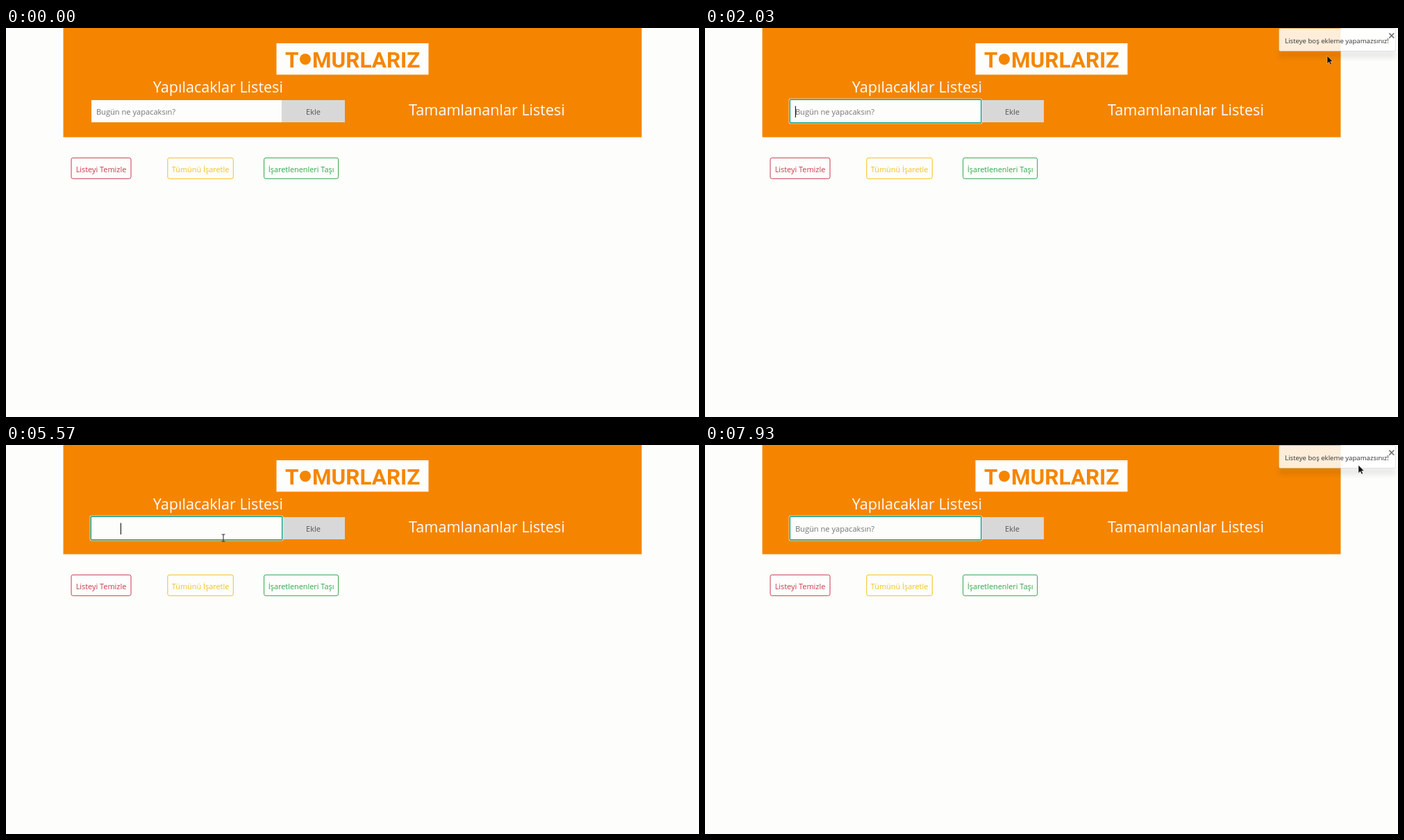
An HTML page for the animation above (8 s loop, 998 px wide and 561 px high).

```html
<!DOCTYPE html>
<html lang="tr">
<head>
<meta charset="utf-8">
<style>
  html, body { margin: 0; width: 100%; height: 100%; overflow: hidden; background: #fdfdfc; }
  svg { display: block; width: 998px; height: 561px; font-family: "Open Sans", "Noto Sans", sans-serif; }
  text { text-anchor: middle; }
  .title { font-size: 21.6px; fill: #fdfdfc; }
  .label { font-size: 11.1px; fill: #555; }
  .button { font-size: 10.9px; }
  .brand { font: 700 31.5px Roboto, sans-serif; fill: #f58600; text-anchor: start; }
</style>
</head>
<body>
<svg viewBox="0 0 998 561">
  <defs>
    <filter id="shadow" x="-20%" y="-50%" width="140%" height="220%">
      <feGaussianBlur stdDeviation="4"/>
    </filter>
  </defs>

  <rect x="82.5" width="833" height="157.5" fill="#f58500"/>
  <rect x="389.5" y="22" width="219" height="45.3" fill="#fdfdfc"/>
  <text class="brand" x="402" y="56.5">T</text>
  <circle cx="431" cy="45" r="8" fill="#f58600"/>
  <text class="brand" x="441" y="56.5">MURLARIZ</text>

  <text class="title" x="305.3" y="93">Yapılacaklar Listesi</text>
  <text class="title" x="692.5" y="125.5">Tamamlananlar Listesi</text>

  <rect x="123" y="104" width="274" height="32" fill="#fdfdfc"/>
  <rect id="add" x="397" y="104" width="91" height="32"/>
  <text class="label" x="442.5" y="125">Ekle</text>
  <g id="focus" fill="none">
    <rect x="121.2" y="102.2" width="277.6" height="35.6" rx="1.5" stroke="#fdfdfc" stroke-width=".9"/>
    <rect x="122.3" y="103.3" width="275.4" height="33.4" rx="1" stroke="#16a085" stroke-width="1.4"/>
  </g>
  <text id="hint" class="label" x="187" y="125" style="fill:#747474">Bugün ne yapacaksın?</text>
  <rect id="caret" y="112.5" width="1.2" height="16.5" fill="#222"/>

  <g id="buttons"></g>

  <g id="toast">
    <path d="M826 34 H995 V42 H826Z" fill="#000" opacity=".1" filter="url(#shadow)"/>
    <rect x="826.5" y=".5" width="168" height="33" rx="2" fill="#fff" fill-opacity=".85" stroke="#000" stroke-opacity=".1"/>
    <text x="910" y="22" font-size="9.6" fill="#333">Listeye boş ekleme yapamazsınız!</text>
    <path d="M985.3 7.5 l7 7 m0 -7 l-7 7" stroke="#666670" stroke-width="1.6"/>
  </g>

  <g id="pointer">
    <path id="arrow" d="M0 0 V11.5 L2.7 9 L4.6 13 L6.4 12.2 L4.7 8.3 H8Z" fill="#111" stroke="#eee" stroke-width=".5"/>
    <path id="hand" d="M-1 1 Q0 0 1 1 V4.5 L4.5 5 Q5.5 5.5 5.5 7 V8.5 L4.5 11.5 H-1 L-3 7.5 Q-3 6 -1 7Z" fill="#111"/>
    <path id="beam" d="M-2.5 -5 H-.5 L0 -4.5 L.5 -5 H2.5 M0 -4.5 V4.5 M-2.5 5 H-.5 L0 4.5 L.5 5 H2.5" fill="none" stroke="#333" stroke-width="1.1"/>
  </g>
</svg>
<script>
const LOOP = 8000;
const $ = id => document.getElementById(id);
const clamp = v => Math.max(0, Math.min(1, v));
const show = (id, on) => { $(id).style.display = on ? '' : 'none'; };

const buttons = [
  ['Listeyi Temizle', 86, '#cb3a4c'],
  ['Tümünü İşaretle', 94.5, '#f2c21c'],
  ['İşaretlenenleri Taşı', 107, '#31a64b'],
];
$('buttons').innerHTML = buttons.map(([name, width, color], i) => {
  const x = 94 + i * 138.8;
  return `<rect x="${x}" y="187.3" width="${width}" height="30" rx="2.5" fill="none" stroke="${color}"/>
    <text class="button" x="${x + width / 2}" y="207.5" fill="${color}">${name}</text>`;
}).join('');

const spots = {
  side: [45, 195], field: [260, 122], add: [434, 122], alert: [896, 40],
  close: [941, 29], below: [304, 180], rest: [313, 134], middle: [559, 91],
};
const visits = [
  [60, 'side'], [700, 'field'], [840, 'add'], [1080, 'add'], [2030, 'alert'],
  [3200, 'close'], [3900, 'add'], [4200, 'below'], [4800, 'rest'], [5600, 'rest'],
  [5880, 'add'], [6300, 'add'], [6400, 'middle'], [7930, 'close'],
];
const focusTime = 720, clicks = [980, 5950], toastTime = 4080;
const typing = { start: 5120, end: 5500, spaces: 10 };

function pointerAt(t) {
  const next = visits.findIndex(([time]) => time > t);
  if (next < 1) return spots[next ? 'close' : 'side'];
  const [[t0, from], [t1, to]] = visits.slice(next - 1, next + 1);
  const k = (t - t0) / (t1 - t0), eased = k * k * (3 - 2 * k);
  return spots[from].map((v, i) => v + (spots[to][i] - v) * eased);
}

function shapeAt([x, y]) {
  if (y < 104 || y >= 136 || x < 123 || x >= 488) return 'arrow';
  return x < 397 ? 'beam' : 'hand';
}

// A linear 300 ms colour transition equals the hover share of the last 300 ms
function hoverAt(t) {
  const steps = 30;
  let hits = 0;
  for (let i = 0; i < steps; i++) hits += shapeAt(pointerAt(t - i * 10)) === 'hand';
  return hits / steps;
}

function draw(t) {
  const point = pointerAt(t), shape = shapeAt(point);
  for (const id of ['arrow', 'hand', 'beam']) show(id, id === shape);
  show('pointer', t >= visits[0][0]);
  $('pointer').setAttribute('transform', `translate(${point})`);

  const gray = 216 - 35 * hoverAt(t);
  $('add').setAttribute('fill', `rgb(${gray},${gray},${gray})`);

  const age = t - clicks.findLast(time => time <= t);
  $('toast').style.opacity = clamp(age / 150) * clamp((toastTime - age) / 150) || 0;

  const cleared = t >= clicks[1];
  const progress = clamp((t - typing.start) / (typing.end - typing.start));
  const typed = cleared ? 0 : Math.ceil(typing.spaces * progress);
  const lastInput = cleared ? clicks[1] : typed ? Math.min(t, typing.end) : focusTime;
  show('focus', t >= focusTime);
  show('hint', !typed);
  show('caret', t >= focusTime && (t - lastInput) % 1000 < 500);
  $('caret').setAttribute('x', 129.8 + 3.5 * typed);
}

function tick() {
  draw(performance.now() % LOOP);
  requestAnimationFrame(tick);
}
tick();
</script>
</body>
</html>
```
